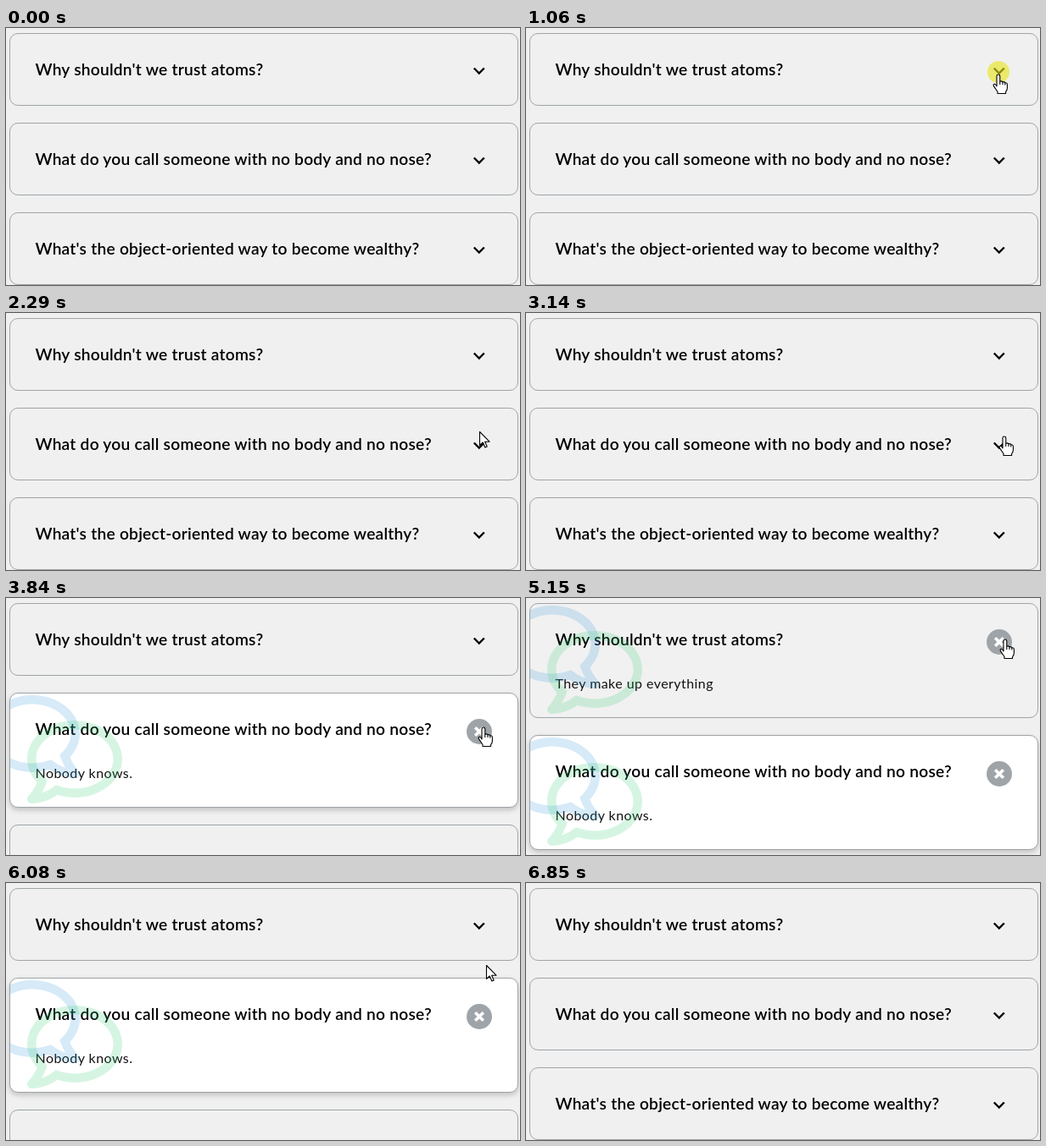
An HTML page for the animation above (7.15 s loop, 606x304 px).

```html
<!DOCTYPE html>
<html lang="en">
<head>
<meta charset="utf-8">
<title>FAQ accordion</title>
<style>
  html, body { margin: 0; width: 100%; height: 100%; overflow: hidden; background: #f0f0f0; }
  #stage { position: relative; width: 606px; height: 304px; overflow: hidden; }
  .card {
    position: absolute; left: 4px; width: 600px; height: 86px;
    box-sizing: border-box; overflow: hidden;
    border: 1px solid #9fa4a8; border-radius: 10px;
  }
  .card.open { height: 136px; }
  .card svg { position: absolute; left: -1px; top: -1px; }
  text { font-family: Lato, "Open Sans", sans-serif; fill: #000; }
  .title { font-size: 19.2px; font-weight: 600; letter-spacing: .23px; }
  .answer { font-size: 16px; letter-spacing: .44px; fill: #111; }
  .on { display: none; }
  .open .on { display: inline; }
  .open .off { display: none; }
  .bubble { opacity: .2; }
  .chevron { fill: none; stroke: #000; stroke-width: 2.4; }
  .cross { fill: none; stroke: #fff; stroke-width: 3.6; }
  #pointer { position: absolute; left: 0; top: 0; }
  #mover path { fill: #fff; stroke: #000; stroke-width: 1.1; stroke-linejoin: round; }
  #press { fill: #e8e414; opacity: .6; }
</style>
</head>
<body>
<div id="stage">
  <svg id="pointer" width="606" height="304">
    <defs>
      <path id="speech" d="M256 32C114.6 32 0 125.1 0 240c0 47.6 19.9 91.2 52.9 126.3C38 405.7 7 439.1 6.5 439.5c-6.6 7-8.4 17.2-4.6 26S14.4 480 24 480c61.5 0 110-25.7 139.1-46.3C192 442.8 223.2 448 256 448c141.4 0 256-93.1 256-208S397.4 32 256 32zm0 368c-26.7 0-53.1-4.1-78.4-12.1l-22.7-7.2-19.5 13.8c-14.3 10.1-33.9 21.4-57.5 29 7.3-12.1 14.4-25.7 19.9-40.2l10.6-28.1-20.6-21.8C69.7 314.1 48 282.2 48 240c0-88.2 93.3-160 208-160s208 71.8 208 160-93.3 160-208 160z"/>
    </defs>
    <g id="mover">
      <circle id="press" cy="-3" r="13"/>
      <path id="arrow" d="M.5.5V16.5L4.2 13l2.6 6 2.4-1-2.6-5.8H12z"/>
      <g id="hand">
        <path d="M-2 14V1.9a1.9 1.9 0 0 1 3.8 0V8.2q2-1 3.2.6q2-.6 2.8 1q2.4-.4 2.6 2V16q0 2.5-1.8 4.5V22.5H-1V20.5L-5.6 13.6q-.8-2 .8-2.4q1.4 0 2.8 2.8z"/>
        <path d="M1.8 8.2V12M5 8.8V12M7.8 9.8V12.5"/>
      </g>
    </g>
  </svg>
</div>
<script>
  const LOOP = 7150, TICK = 1000 / 13;   // the picture advances 13 times a second
  const FADE = 3.9;                      // 0.3 s in ticks
  const TOP = 6, GAP = 20;

  // spans: [opened, closed] in ticks
  const cards = [
    { title: "Why shouldn't we trust atoms?", answer: "They make up everything", spans: [[14.8, 26.8], [66.8, 75.8]] },
    { title: "What do you call someone with no body and no nose?", answer: "Nobody knows.", spans: [[45.8, 85.8]] },
    { title: "What's the object-oriented way to become wealthy?", answer: "", spans: [] }
  ];

  // [tick, x, y] of the pointer tip
  const path = [
    [1, 566, 292], [10, 560, 63], [11, 557, 55], [26, 557, 55],
    [35, 559, 247], [36, 559, 246], [38, 559, 246], [41, 564, 146],
    [44, 564, 146], [46, 563, 153], [59, 563, 153], [63, 565, 49],
    [75, 565, 49], [79, 566, 97], [84, 562, 156], [85, 562, 156], [89, 563, 306]
  ];
  const presses = [[13, 15], [26, 27], [44, 46], [66, 67], [75, 76], [85, 86]];

  const $ = id => document.getElementById(id);
  const show = (el, on) => { el.style.display = on ? "" : "none"; };

  for (const card of cards) {
    const el = card.el = document.createElement("div");
    el.innerHTML = `<svg width="600" height="136">
      <text class="title" x="30.5" y="50">${card.title}</text>
      <path class="chevron off" d="M547.8 41.5l6 6 6-6"/>
      <g class="on">
        <text class="answer" x="30.5" y="101">${card.answer}</text>
        <circle cx="554" cy="46" r="15" fill="#9fa4a8"/>
        <path class="cross" d="M549.2 41.2l9.6 9.6m0-9.6l-9.6 9.6"/>
        <use class="bubble" href="#speech" fill="#3498db" transform="translate(83 -4) scale(-.21875 .21875)"/>
        <use class="bubble" href="#speech" fill="#2ecc71" transform="translate(21 26) scale(.21875)"/>
      </g></svg>`;
    $("stage").insertBefore(el, $("pointer"));
  }

  // cubic-bezier(.25, .1, .25, 1)
  function ease(x) {
    if (x <= 0) return 0;
    if (x >= 1) return 1;
    const curve = (a, b, s) => 3 * a * s * (1 - s) ** 2 + 3 * b * s * s * (1 - s) + s ** 3;
    let lo = 0, hi = 1;
    for (let i = 0; i < 20; i++) {
      const mid = (lo + hi) / 2;
      if (curve(.25, .25, mid) < x) lo = mid; else hi = mid;
    }
    return curve(.1, 1, lo);
  }

  function drawCards(k) {
    let y = TOP;
    for (const card of cards) {
      let open = false, white = 0;
      for (const [from, to] of card.spans) {
        if (k >= from && k < to) open = true;
        white += ease((k - from) / FADE) - ease((k - to) / FADE);
      }
      const shadow = `0 3px 6px rgba(0,0,0,${.1 * white})`;
      card.y = y;
      card.el.className = open ? "card open" : "card";
      card.el.style.top = y + "px";
      card.el.style.backgroundColor = `rgba(255,255,255,${white})`;
      card.el.style.boxShadow = `${shadow}, ${shadow}`;
      y += (open ? 136 : 86) + GAP;
    }
  }

  function drawPointer(k) {
    const i = path.findIndex(p => p[0] > k);
    show($("mover"), i > 0);
    if (i < 1) return;
    const [k0, x0, y0] = path[i - 1], [k1, x1, y1] = path[i];
    const u = (k - k0) / (k1 - k0);
    const x = x0 + (x1 - x0) * u, y = y0 + (y1 - y0) * u;
    const over = cards.some(c => x >= 543 && x <= 573 && y >= c.y + 31 && y <= c.y + 61);
    $("mover").setAttribute("transform", `translate(${Math.round(x)} ${Math.round(y)})`);
    show($("hand"), over);
    show($("arrow"), !over);
    show($("press"), presses.some(([from, to]) => k >= from && k < to));
  }

  const start = performance.now();
  function frame() {
    const t = (performance.now() - start) % LOOP;
    const k = Math.min(92, Math.floor((t + 25) / TICK));
    drawCards(k);
    drawPointer(k);
    requestAnimationFrame(frame);
  }
  frame();
</script>
</body>
</html>
```
